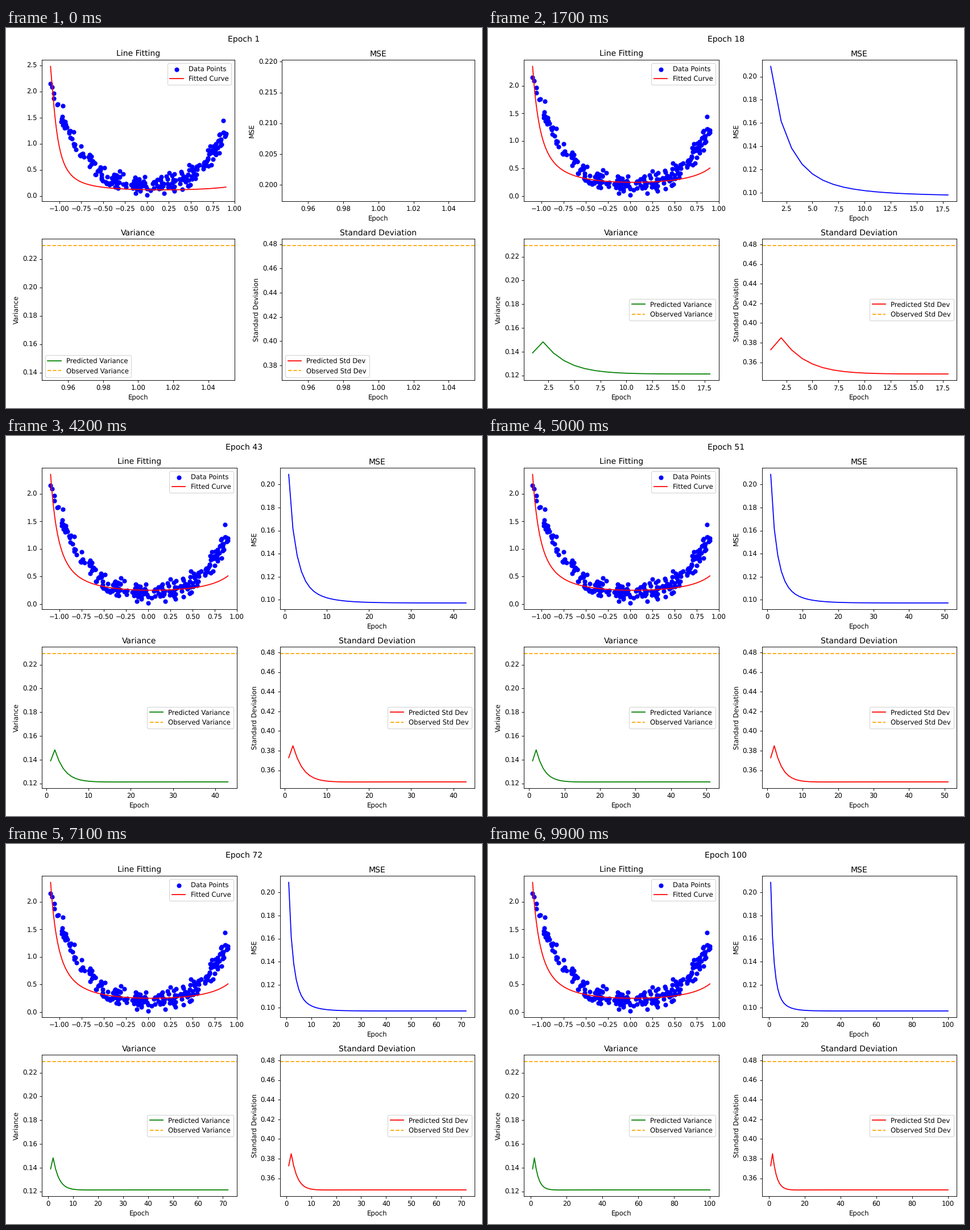
Write a matplotlib script that moves like this. It is 837x669 px and loops after 10000 ms.

```python
import numpy as np
import matplotlib.pyplot as plt
from matplotlib.animation import FuncAnimation

# Unhinted glyphs keep text at its true fractional size
plt.rcParams["text.hinting"] = "none"

EPOCHS = 100
DPI = 83.7
OBSERVED = 0.2295
LEFT, RIGHT = -1.1, 0.9


def settle(level, *terms):
    """A level plus decaying terms, each given as (size, ratio per epoch)."""
    k = np.arange(EPOCHS)
    return level + sum(size * ratio**k for size, ratio in terms)


# Noisy samples of an even quartic, with a few strays that set the extent
rng = np.random.default_rng(4)
strays = np.array([(-1.1, 2.15), (-0.96, 1.72), (0, 0.02), (0.87, 1.44), (0.9, 1.19)])
x = rng.uniform(LEFT, RIGHT, 235)
noise = np.clip(rng.normal(0, 0.09, x.size), -0.2, 0.2)
y = np.clip(0.2 + 0.7 * x**2 + 0.75 * x**4 + noise, 0.05, 2.19)
px = np.append(strays[:, 0], x)
py = np.append(strays[:, 1], y)

epochs = np.arange(1, EPOCHS + 1)
mse = settle(0.0973, (0.0258, 0.815), (0.0765, 0.56), (0.0092, 0.05))
var = settle(0.1213, (0.0442, 0.65), (-0.0015, 0.85), (-0.025, 0.02))
std = np.sqrt(var)

curve_x = np.linspace(LEFT, RIGHT, 200)


def fitted(i):
    """Reciprocal of a parabola with a dip near its left end."""
    w = (mse[i] - mse[-1]) / (mse[0] - mse[-1])
    left = 1 / (2.35 + 7.2 * (var[i] - var[-1]))
    mid = 1 / (0.25 - 0.13 * w)
    right = 1 / (0.51 - 0.34 * w)
    parabola = np.polyfit([LEFT, 0, RIGHT], [left, mid, right], 2)
    d = curve_x - LEFT
    dip = (2.2 + 7.6 * w) * d * np.exp(-d / 0.18)
    return 1 / (np.polyval(parabola, curve_x) - dip)


fig, axes = plt.subplots(2, 2, figsize=(10, 669.001 / DPI), dpi=DPI)
(ax_fit, ax_mse), (ax_var, ax_std) = axes
title = fig.suptitle("Epoch 1")

ax_fit.scatter(px, py, color="blue", label="Data Points")
fit_line, = ax_fit.plot(curve_x, fitted(0), color="red", label="Fitted Curve")
ax_fit.set_title("Line Fitting")
ax_fit.legend(loc="upper right")


def history(ax, name, color, short=None, level=None):
    label = f"Predicted {short}" if short else None
    line, = ax.plot([], [], color=color, label=label)
    ax.set(title=name, xlabel="Epoch", ylabel=name)
    if short:
        ax.axhline(level, color="orange", linestyle="--", label=f"Observed {short}")
        ax.legend()
    return line


tracks = [
    (ax_mse, history(ax_mse, "MSE", "blue"), mse),
    (ax_var, history(ax_var, "Variance", "green", "Variance", OBSERVED), var),
    (ax_std, history(ax_std, "Standard Deviation", "red", "Std Dev",
                     OBSERVED**0.5), std),
]


def update(i):
    title.set_text(f"Epoch {i + 1}")
    fit = fitted(i)
    fit_line.set_ydata(fit)
    lo, hi = py.min(), max(py.max(), fit.max())
    pad = 0.05 * (hi - lo)
    ax_fit.set_ylim(lo - pad, hi + pad)
    for ax, line, values in tracks:
        line.set_data(epochs[:i + 1], values[:i + 1])
        ax.relim()
        ax.autoscale_view()
    fig.tight_layout()
    return []


anim = FuncAnimation(fig, update, frames=EPOCHS, interval=100,
                     repeat=True, repeat_delay=0, blit=False)
plt.show()
```
